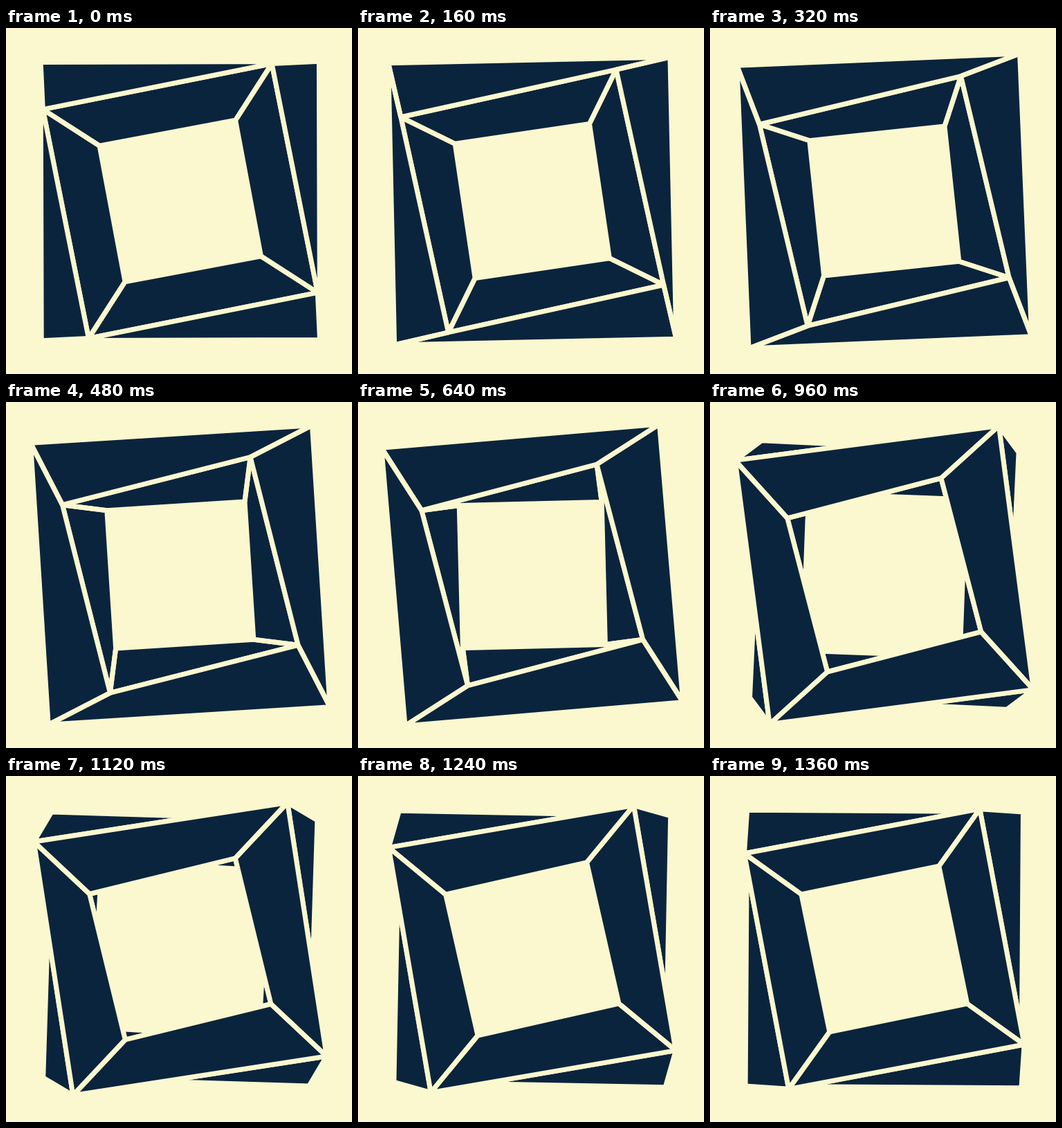
An HTML page with a canvas for the animation above (1.44 s loop, 500 by 500 pixels).

```html
<!DOCTYPE html>
<html lang="en">
<head>
<meta charset="utf-8">
<title>Turning square ring</title>
<style>
  html, body { margin: 0; width: 100%; height: 100%; overflow: hidden; background: #fbf8cf; }
  canvas { display: block; width: 500px; height: 500px; }
</style>
</head>
<body>
<canvas id="stage" width="500" height="500"></canvas>
<script>
const ctx = document.getElementById('stage').getContext('2d');
const LIGHT = '#fbf8cf', DARK = '#0b243d';
const LOOP = 1440, STEP = 40, STEPS = 36, LINE = 7;
const CX = 251.8, CY = 250, DEPTH = 0.07;

// One of four squares riding round the tube; u counts quarter turns.
function square(u) {
  const a = u * Math.PI / 2, c = Math.cos(a), s = Math.sin(a);
  const scale = 1 / (1 - DEPTH * s);
  let x = -(159.2 + 42.5 * c + 25.4 * s) * scale;
  let y = -(140.2 + 60.4 * c - 17.1 * s) * scale;
  const points = [];
  for (let i = 0; i < 4; i++) {
    points.push([CX + x, CY + y]);
    [x, y] = [-y, x];
  }
  return points;
}

// Keeps the part of a polygon on one side of the line a-b.
function clip(poly, a, b, side) {
  const dist = p => side * ((b[0] - a[0]) * (p[1] - a[1]) - (b[1] - a[1]) * (p[0] - a[0]));
  const out = [];
  poly.forEach((p, i) => {
    const q = poly[(i + 1) % poly.length], dp = dist(p), dq = dist(q);
    if (dp >= -1e-6) out.push(p);
    if (dp * dq < 0 && Math.min(Math.abs(dp), Math.abs(dq)) > 1e-6) {
      const k = dp / (dp - dq);
      out.push([p[0] + (q[0] - p[0]) * k, p[1] + (q[1] - p[1]) * k]);
    }
  });
  return out;
}

function toPath(poly) {
  const path = new Path2D();
  poly.forEach(p => path.lineTo(p[0], p[1]));
  path.closePath();
  return path;
}

// Four faces between a near square and the next one, outside (-1) or inside (1) it.
function drawRing(near, far, side) {
  const faces = near.map((a, i) => {
    const j = (i + 1) % 4;
    return toPath(clip([a, near[j], far[j], far[i]], a, near[j], side));
  });
  faces.forEach(f => ctx.fill(f));
  faces.forEach(f => ctx.stroke(f));
}

function draw(p) {
  const [back, outer, front, inner] = [-1, 0, 1, 2].map(k => square(p + k));
  ctx.fillStyle = LIGHT;
  ctx.fillRect(0, 0, 500, 500);
  ctx.fillStyle = DARK;
  ctx.strokeStyle = LIGHT;
  ctx.lineWidth = LINE;
  ctx.lineJoin = 'round';
  // The ring facing the viewer goes last and hides what overlaps it.
  drawRing(front, inner, 1);
  drawRing(outer, back, -1);
  drawRing(front, outer, -1);
}

const start = performance.now();
function tick() {
  const t = (performance.now() - start) % LOOP;
  // The last pose is held for two steps.
  const step = Math.min(Math.floor(t / STEP), STEPS - 2);
  draw(step / STEPS);
  requestAnimationFrame(tick);
}
tick();
</script>
</body>
</html>
```
